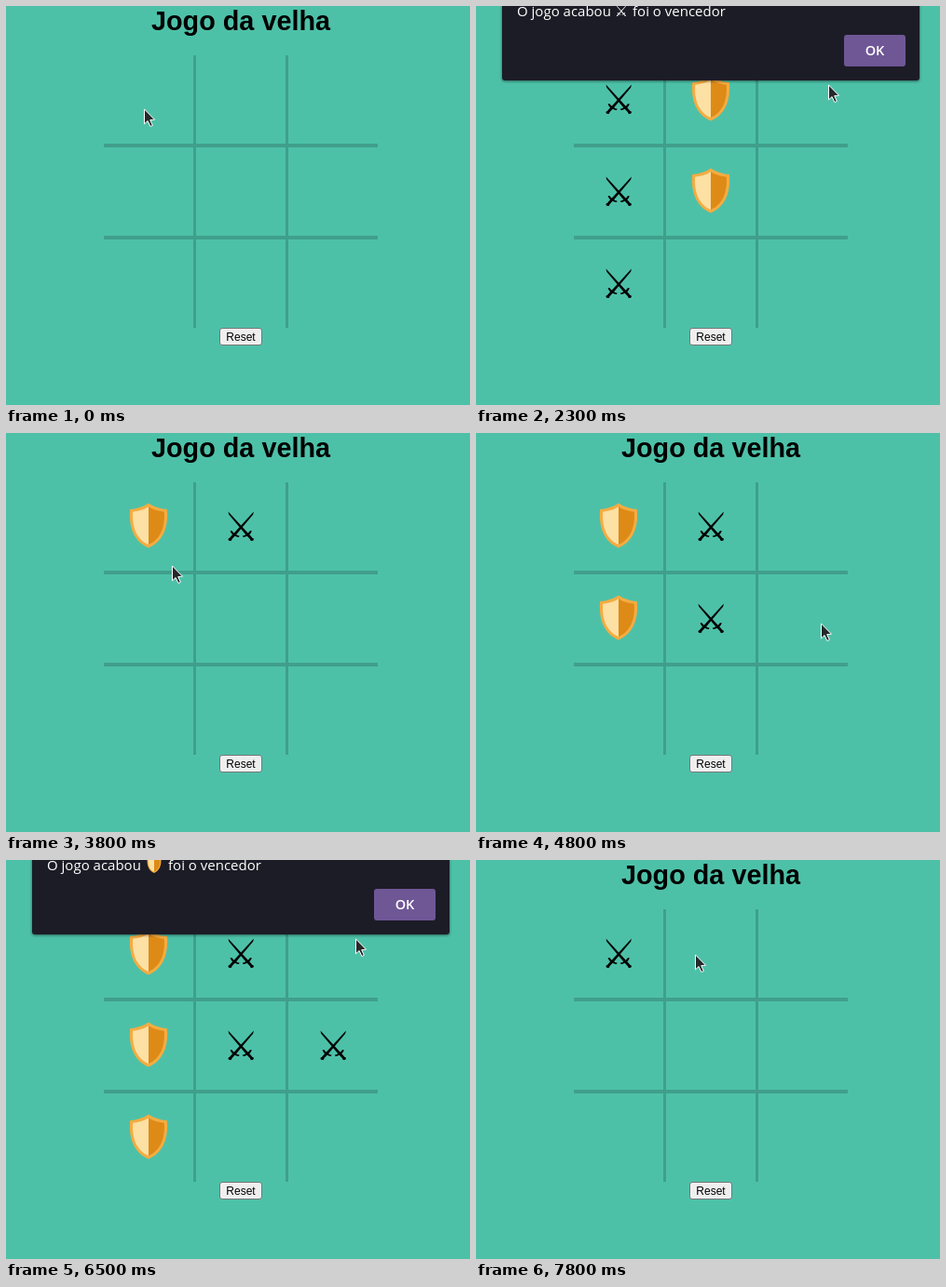
An HTML page that plays this animation: 498x429 px, repeating every 8 s.

```html
<!DOCTYPE html>
<html lang="pt">
<head>
<meta charset="utf-8">
<title>Jogo da velha</title>
<style>
  html, body { margin: 0; width: 100%; height: 100%; overflow: hidden; background: #4dc1a8; }
  svg { display: block; width: 498px; height: 429px; }
  .page { font-family: "Liberation Sans", Arial, sans-serif; text-anchor: middle; }
  .swords { font-family: "DejaVu Sans", sans-serif; text-anchor: middle; }
  .alert { font: 500 15px "Open Sans", "Noto Sans", sans-serif; fill: #fff; }
</style>
</head>
<body>
<svg viewBox="0 0 498 429">
  <defs>
    <text id="swords" class="swords" font-size="43.2">⚔</text>
    <g id="shield">
      <path d="M0-24C-6-20-13-18-19.8-17.4C-21.5-1-17 17 0 24C17 17 21.5-1 19.8-17.4C13-18 6-20 0-24Z" fill="#f4ac41"/>
      <path d="M0-20.2C-5-17-11-15.3-16.8-14.7C-17.8 0-14 14.5 0 20.6Z" fill="#fce0a4"/>
      <path d="M0-20.2C5-17 11-15.3 16.8-14.7C17.8 0 14 14.5 0 20.6Z" fill="#de8a17"/>
    </g>
    <filter id="shadow" x="-5%" y="-20%" width="110%" height="140%">
      <feDropShadow dx="0" dy="1" stdDeviation="1.6" flood-color="#000" flood-opacity=".5"/>
    </filter>
  </defs>

  <rect width="498" height="429" fill="#4dc1a8"/>
  <g class="page">
    <text x="252" y="26" font-size="28.8" font-weight="700">Jogo da velha</text>
    <path d="M202.5 53V346M301.5 53V346" stroke="#409f8b" stroke-width="3"/>
    <path d="M105 150H399M105 249H399" stroke="#409f8b" stroke-width="4"/>
    <rect x="229.5" y="346.5" width="45" height="18" rx="2.5" fill="#efefef" stroke="#767676"/>
    <text x="252" y="360" font-size="12">Reset</text>
  </g>
  <g id="board"></g>

  <g id="dialog" class="alert">
    <rect x="28" y="-40" width="448" height="120" rx="3" fill="#1e1c26" filter="url(#shadow)"/>
    <text x="44" y="11">O jogo acabou</text>
    <use id="winner"/>
    <text id="ending" y="11">foi o vencedor</text>
    <rect x="395" y="31" width="66" height="34" rx="3" fill="#6f5796"/>
    <text x="428" y="53" font-size="14.5" font-weight="600" text-anchor="middle">OK</text>
  </g>

  <path id="cursor" d="M.5.9V16.8L4.1 13.5L6.9 19.5L9.4 18.4L6.7 12.6L11.5 12.2Z"
        fill="#26282a" stroke="#fff" stroke-linejoin="round"/>
</svg>
<script>
const LOOP = 8000, STEP = 100, CELL = 99;
const HOP = 200, GLIDE = 420;
const $ = id => document.getElementById(id);
const clamp = v => Math.min(1, Math.max(0, v));
const smooth = v => v * v * (3 - 2 * v);
const set = (el, attrs) => Object.entries(attrs).forEach(([k, v]) => el.setAttribute(k, v));
const show = (el, visible) => el.style.display = visible ? "" : "none";

// Clicks of the pointer; those on a free cell place a piece.
const click = (time, x, y) => ({ time, x, y, ok: y < 70 });
const confirm = time => click(time, 418, 48);
const clicks = [
  click(400, 148, 110), click(600, 235, 106), click(800, 155, 205), click(1200, 236, 214),
  click(1800, 137, 300), confirm(2600),
  click(3300, 246, 109), click(3600, 176, 107), click(3800, 178, 142), click(4200, 240, 190),
  click(4600, 150, 206), click(5100, 370, 204), click(5700, 120, 302), confirm(6800),
  click(7600, 148, 96), click(LOOP, 235, 101)
];

// Centres the ink of the glyph on its own origin.
function centreSwords() {
  const ctx = document.createElement("canvas").getContext("2d");
  ctx.font = '43.2px "DejaVu Sans", sans-serif';
  const ink = ctx.measureText("⚔");
  set($("swords"), { y: (ink.actualBoundingBoxAscent - ink.actualBoundingBoxDescent) / 2 });
}

// Plays the clicks by the rules of the game.
function play() {
  const games = [];
  let pieces = [];
  for (const { time, x, y, ok } of clicks) {
    if (ok) {
      games.push({ pieces, alert: pieces.at(-1).time + STEP, clear: time + STEP });
      pieces = [];
      continue;
    }
    const col = Math.floor((x - 104) / CELL), row = Math.floor((y - 52) / CELL);
    if (pieces.some(p => p.col === col && p.row === row)) continue;
    const kind = pieces.length % 2 ? "shield" : "swords";
    const el = document.createElementNS("http://www.w3.org/2000/svg", "use");
    set(el, { href: "#" + kind, transform: `translate(${153 + col * CELL} ${99.5 + row * CELL})` });
    $("board").append(el);
    pieces.push({ el, time, col, row, kind });
  }
  return [...games, { pieces, alert: Infinity, clear: Infinity }];
}

// Short hops between cells, longer glides to and from the alert.
function pointerAt(t) {
  const i = clicks.findIndex(c => c.time >= t);
  if (i === 0) return clicks[0];
  const from = clicks[i - 1], to = clicks[i];
  const travel = from.ok || to.ok ? GLIDE : HOP;
  const leave = to.ok ? to.time - 2 * STEP - travel : from.time + (from.ok ? STEP : 0);
  const k = smooth(clamp((t - leave) / travel));
  return { x: from.x + (to.x - from.x) * k, y: from.y + (to.y - from.y) * k };
}

function alertLevel(t, { alert, clear }) {
  if (t < alert) return 0;
  if (t < clear) return smooth(clamp((t - alert + 60) / 220));
  return clamp(1 - (t - clear + 60) / 300) ** 2.2;
}

function renderAlert(t) {
  const game = games.find(g => t < g.clear + 4 * STEP);
  const level = alertLevel(t, game);
  const kind = game.pieces.at(-1).kind, shield = kind === "shield";
  show($("dialog"), level > 0);
  set($("dialog"), { opacity: level, transform: `translate(0 ${-19 * (1 - level)})` });
  set($("winner"), { href: "#" + kind, transform: `translate(${shield ? 159 : 156} 5) scale(.37)` });
  set($("ending"), { x: shield ? 174 : 168 });
}

function render(t) {
  for (const { pieces, clear } of games)
    for (const { el, time } of pieces) show(el, t >= time && t < clear);
  renderAlert(t);
  const { x, y } = pointerAt(t);
  set($("cursor"), { transform: `translate(${Math.round(x)} ${Math.round(y)})` });
}

centreSwords();
const games = play();
const start = performance.now();
function tick() {
  const t = (performance.now() - start) % LOOP;
  render(Math.floor(t / STEP) * STEP);
  requestAnimationFrame(tick);
}
tick();
</script>
</body>
</html>
```
